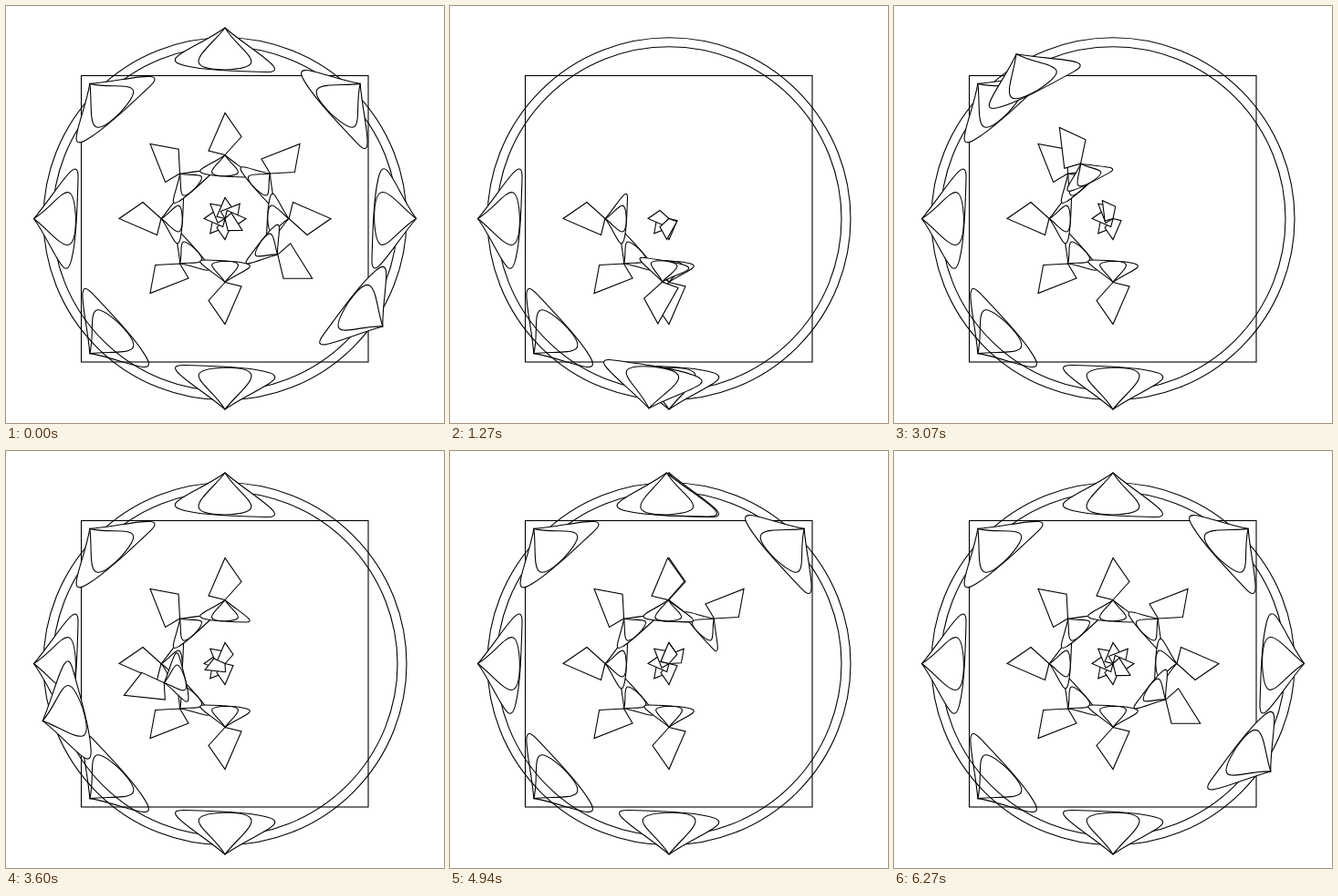
Recreate the animation shown at these times as an HTML page. Size 480 by 458 pixels, loop 6340 ms.

```html
<!DOCTYPE html>
<html lang="en">
<head>
<meta charset="utf-8">
<title>Rotating motif</title>
<style>
html, body { margin: 0; width: 100%; height: 100%; overflow: hidden; background: #fff; }
svg { display: block; width: 480px; height: 458px; fill: none; stroke: #000; stroke-width: 1.1; }
path { fill: #fff; vector-effect: non-scaling-stroke; }
</style>
</head>
<body>
<svg viewBox="0 0 480 458">
  <defs>
    <g id="shapes">
      <path d="M0 209.5C-30 184 -75 160 -44 161C-10 162 24 163 44 168C75 175 32 187 0 209.5Z"/>
      <path d="M0 209.5C-16 183 -56 166 0 163.5C55 164 18 186 0 209.5Z"/>
      <path d="M0 70L18 74.5L0 116L-18 90Z"/>
    </g>
    <g id="motif">
      <use href="#shapes"/>
      <use href="#shapes" transform="translate(0 -35) scale(.5)"/>
    </g>
  </defs>
  <g id="back" transform="translate(240 233.5)"></g>
  <rect x="82.5" y="76.5" width="314.5" height="314.5"/>
  <circle cx="240" cy="233.8" r="199"/>
  <circle cx="240" cy="233.8" r="189"/>
  <g id="front" transform="translate(240 233.5)"><use href="#motif"/></g>
</svg>
<script>
const LOOP = 6340, FPS = 15, LAST = 94;
// Start and length of each turn, in steps; turn k sweeps 45 * (k + 1) degrees.
const turns = [[-12.3, 15], [3, 15], [18.32, 15.2], [33.84, 14.63],
               [49.1, 15.2], [64.2, 14.76], [79.6, 14.9]];

// The first copy lies under the frame, the others cover it.
const copies = turns.map((_, k) => {
  const use = document.createElementNS('http://www.w3.org/2000/svg', 'use');
  use.setAttribute('href', '#motif');
  return document.getElementById(k ? 'front' : 'back').appendChild(use);
});
const origin = performance.now();

function draw() {
  const time = (performance.now() - origin) % LOOP;
  // The loop opens on the finished pose.
  const step = Math.min(LAST, Math.floor(time * FPS / 1000)) || LAST;
  turns.forEach(([start, span], k) => {
    const progress = Math.max(0, Math.min(1, (step - start) / span));
    copies[k].setAttribute('transform', `rotate(${45 * (k + 1) * progress})`);
    copies[k].setAttribute('visibility', step < start ? 'hidden' : 'visible');
  });
  requestAnimationFrame(draw);
}
draw();
</script>
</body>
</html>
```
